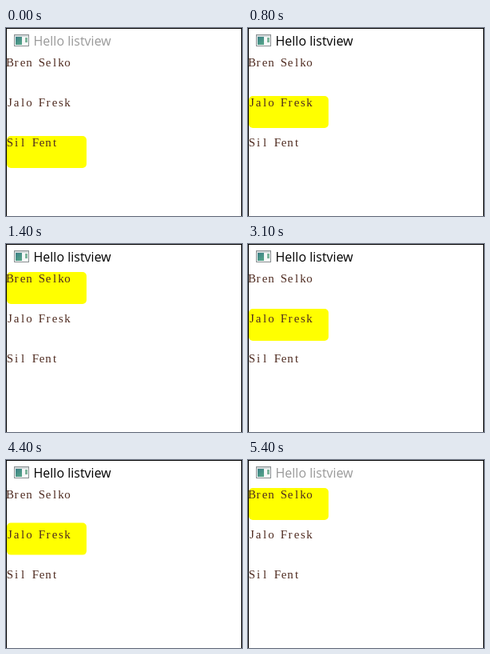
An HTML page with a canvas that plays this animation: 296x235 px, repeating every 5.5 s.

```html
<!DOCTYPE html>
<html lang="en">
<head>
<meta charset="utf-8">
<title>Hello listview</title>
<style>
  html, body { margin: 0; width: 100%; height: 100%; overflow: hidden; background: #fff; }
  canvas { display: block; }
</style>
</head>
<body>
<canvas id="stage" width="296" height="235"></canvas>
<script>
const ctx = document.getElementById('stage').getContext('2d', { alpha: false });
const LOOP = 5500, STEP = 100, SPEED = 0.4;
const TOP = 35, ROW = 50, CELL = 8;
const names = ['Bren Selko', 'Jalo Fresk', 'Sil Fent'];

// The bar travels at constant speed; "lead" is the time already spent at the first visible step.
const moves = [
  { at: 700, row: 1, lead: 115 },
  { at: 1300, row: 0, lead: 115 },
  { at: 3100, row: 1, lead: 115 },
  { at: 3800, row: 2, lead: 115 },
  { at: 4400, row: 0, lead: 141 }
];

function rect(color, x, y, w, h) {
  ctx.fillStyle = color;
  ctx.fillRect(x, y, w, h);
}

function barY(t) {
  let y = TOP + 2 * ROW;
  for (const { at, row, lead } of moves) {
    if (t < at) break;
    const gap = TOP + row * ROW - y;
    y += Math.sign(gap) * Math.min(Math.abs(gap), (t - at + lead) * SPEED);
  }
  return y;
}

function drawIcon() {
  rect('#8a9092', 10, 8, 19, 15);
  rect('#f6f8f8', 11, 9, 17, 13);
  rect('#d3d9da', 11, 9, 17, 2);
  const teal = ctx.createLinearGradient(12, 11, 20, 21);
  teal.addColorStop(0, '#3b7f86');
  teal.addColorStop(1, '#58a889');
  rect(teal, 12, 11, 8, 10);
  rect('#7fb59c', 24, 12, 3, 6);
}

function drawTitle(active) {
  ctx.font = '16px "Open Sans", "Noto Sans", sans-serif';
  ctx.textAlign = 'left';
  ctx.fillStyle = active ? '#000' : '#999';
  ctx.fillText('Hello listview', 34.5, 22);
}

function drawBar(y) {
  ctx.fillStyle = '#ff0';
  ctx.beginPath();
  ctx.roundRect(1, y, 100, 40, 5);
  ctx.fill();
}

function drawNames() {
  ctx.font = '15px "Liberation Serif", serif';
  ctx.textAlign = 'center';
  ctx.fillStyle = '#4f2b20';
  names.forEach((name, row) => {
    [...name].forEach((ch, i) => {
      ctx.fillText(ch, 1 + (i + 0.5) * CELL, TOP + 13 + row * ROW);
    });
  });
}

function draw(now) {
  const t = Math.floor((now % LOOP) / STEP) * STEP;
  rect('#fff', 0, 0, 296, 235);
  drawIcon();
  drawTitle(t >= 600 && t < 5400);
  drawBar(barY(t));
  drawNames();
  rect('#000', 0, 0, 296, 1);
  rect('#000', 0, 0, 1, 235);
  rect('#000', 295, 0, 1, 235);
}

const start = performance.now();
function tick() {
  draw(performance.now() - start);
  requestAnimationFrame(tick);
}
tick();
</script>
</body>
</html>
```
